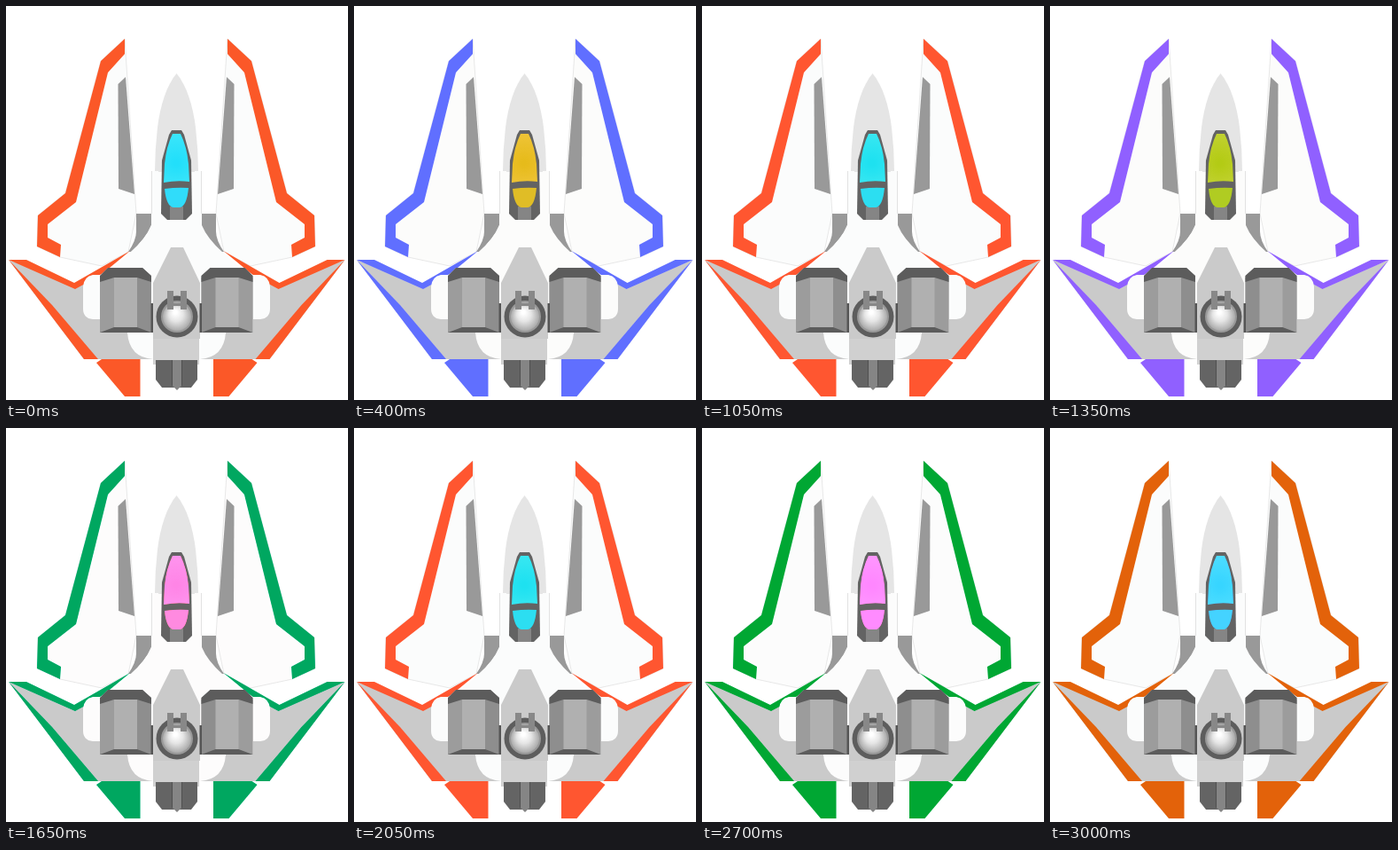
Write an HTML page with a canvas that moves like this. It is 386 px wide and 444 px high and loops after 3.05 s.

```html
<!DOCTYPE html>
<html lang="en">
<head>
<meta charset="utf-8">
<title>Starfighter</title>
<style>
html, body { margin: 0; width: 100%; height: 100%; overflow: hidden; background: #fff; }
canvas { display: block; width: 386px; height: 444px; }
</style>
</head>
<body>
<canvas id="ship" width="386" height="444"></canvas>
<script>
const canvas = document.getElementById('ship');
const ctx = canvas.getContext('2d');
const ACCENT = '#fb5828', WHITE = '#fbfcfc', EDGE = '#dedede', PLATE = '#cacaca';
const STEP = 50, STEPS = 61, TURN = -18, LAG = 0.8;

function fill(path, color, edge) {
  const p = new Path2D(path);
  ctx.fillStyle = color;
  ctx.fill(p);
  if (edge) {
    ctx.strokeStyle = edge;
    ctx.lineWidth = 0.7;
    ctx.stroke(p);
  }
}

// Draws a left part and its mirror image; x and span - x are partners.
function mirrored(draw, span) {
  draw();
  ctx.save();
  ctx.translate(span, 0);
  ctx.scale(-1, 1);
  draw();
  ctx.restore();
}

function disc(x, y, r, color) {
  ctx.beginPath();
  ctx.arc(x, y, r, 0, Math.PI * 2);
  ctx.fillStyle = color;
  ctx.fill();
}

function upperWing() {
  fill('M134 37L107 62L67 211L36 236L35 271L61 283L108 293L138 277L147 234Z', WHITE, EDGE);
  fill('M134 37L107 62L67 211L36 236L35 271L61 283L62 269L47 261L47 246L79 221L115 75L134 54Z', ACCENT);
  fill('M135 80L126.5 88L127 206L145 212Z', '#999');
  fill('M147 234H164V247Q158 262 141 277L138 277Q147 264 147 254Z', '#999');
}

function lowerWing() {
  fill('M3 286L77 316L107 300L137 368L166 398H88Z', PLATE);
  fill('M3 286L88 398H104L52 337Z', ACCENT);
  fill('M3 286H23L77 312L140 276L106 304L78 319Z', ACCENT);
  fill('M108 398H151.5V440H134L102 402Z', ACCENT);
}

function hullSide() {
  fill('M164 186H193V398H166Q139 396 137 368H106V353H98Q87 352 87 341V316Q88 305 98 303H106Q128 291 140 278Q158 262 164 247Z', WHITE);
}

function pod() {
  fill('M106 304L115 295H154L164 304V368H106Z', '#b0b0b0');
  fill('M106 306H122V368H106Z', '#9c9c9c');
  fill('M148 306H164V368H148Z', '#8e8e8e');
  fill('M106 368L122 362H148L164 368Z', '#5c5c5c');
  fill('M106 311V304L115 295H154L164 304V311L148 306H122Z', '#5c5c5c');
  fill('M163.5 335H166V368H163.5Z', '#555');
}

function cockpit() {
  fill('M192.5 76C181 90 174 112 171 137Q168 162 168 187H217Q217 162 214 137C211 112 204 90 192.5 76Z', '#e5e5e5');
  fill('M164 186H172V240H164ZM213 186H221V240H213Z', WHITE);
  fill('M164 186H164.7V234H164ZM220.3 186H221V234H220.3Z', '#d8d8d8');
  fill('M187 140H198L201 145L209 174L210 234L203 241H182L175 234L176 174L184 145Z', '#636363');
  fill('M185 226H200V241H185Z', '#858585');

  const glass = ctx.createRadialGradient(192, 177, 3, 192, 173, 33);
  glass.addColorStop(0, '#22dffa');
  glass.addColorStop(1, '#3ee6fa');
  fill('M188 144H197Q204 158 206 178L207 198Q193 196 178 199L179 178Q181 158 188 144Z', glass);
  fill('M179 206Q193 204 206 205Q204 226 196 227H189Q181 226 179 206Z', '#30dcfa');
}

function core() {
  fill('M186 272H200L219 312V375H166V312Z', PLATE);
  fill('M166 375H218V404H166Z', '#d0d0d0');
  fill('M169 399H216V421L209 430H176L169 421Z', '#646464');
  fill('M188 399H198V428L193 433L188 428Z', '#858585');
  fill('M187 399H188V428H187ZM198 399H199V428H198Z', '#505050');

  disc(193, 350, 23.5, '#5d5d5d');
  disc(193, 350, 18, '#999');
  const ball = ctx.createRadialGradient(191, 345, 2, 193, 350, 16);
  ball.addColorStop(0, '#fff');
  ball.addColorStop(0.45, '#e5e5e5');
  ball.addColorStop(1, '#aaa');
  disc(193, 350, 16, ball);
  fill('M182 321H189V335H197V321H204V342H197V338H189V342H182Z', '#888');
}

ctx.fillStyle = '#fff';
ctx.fillRect(0, 0, 386, 444);
mirrored(upperWing, 384);
mirrored(lowerWing, 385.5);
mirrored(hullSide, 385);
cockpit();
core();
mirrored(pod, 384.5);

// The hue turns once per second in steps, just after the opening pose.
const start = performance.now();
let shown = -1;
function frame(now) {
  const step = Math.floor(Math.max(0, now - start) / STEP) % STEPS;
  if (step !== shown) {
    shown = step;
    canvas.style.filter = `hue-rotate(${TURN * Math.max(0, step - LAG)}deg)`;
  }
  requestAnimationFrame(frame);
}
requestAnimationFrame(frame);
</script>
</body>
</html>
```
